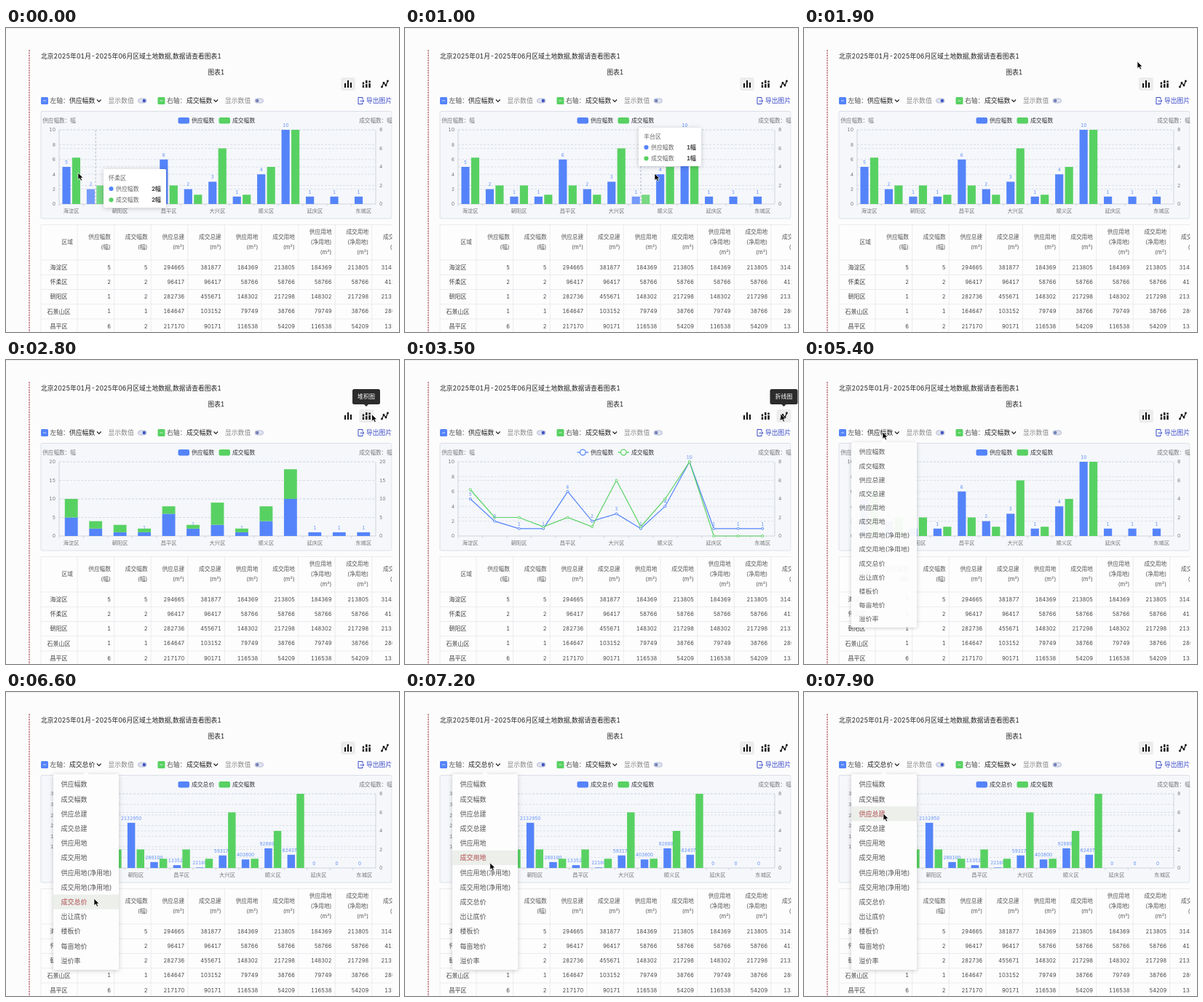
An HTML page for the animation above (8 s loop, 540 by 418 pixels).

```html
<!DOCTYPE html>
<html lang="zh-CN">
<head>
<meta charset="utf-8">
<title>区域土地数据</title>
<style>
html, body { margin: 0; width: 100%; height: 100%; overflow: hidden; background: #fcfcfc; }
svg { display: block; width: 100%; height: 100%; font-family: Inter, "Noto Sans CJK SC", sans-serif; font-variant-numeric: tabular-nums; }
.shadow { filter: drop-shadow(0 1px 3px #0003); }
</style>
</head>
<body>
<svg id="stage" viewBox="0 0 540 418"></svg>
<script>
const BLUE = '#5584fa', GREEN = '#58d163', STEP = 100, LOOP = 8000;
const names = '海淀区 怀柔区 朝阳区 石景山区 昌平区 通州区 大兴区 丰台区 顺义区 房山区 延庆区 密云区 东城区'.split(' ');
const supply = [5, 2, 1, 1, 6, 2, 3, 1, 4, 10, 1, 1, 1];
const deals = [5, 2, 2, 1, 2, 1, 6, 1, 4, 8, 0, 0, 0];
const price = [3143700, 412600, 2132950, 280100, 133520, 22160, 593175, 403800, 928800, 624370, 0, 0, 0];
const options = '供应幅数 成交幅数 供应总建 成交总建 供应用地 成交用地 供应用地(净用地) 成交用地(净用地) 成交总价 出让底价 楼板价 每亩地价 溢价率'.split(' ');
const areas = [
  [294665, 381877, 184369, 213805],
  [96417, 96417, 58766, 58766],
  [282736, 455671, 148302, 217298],
  [164647, 103152, 79749, 38766],
  [217170, 90171, 116538, 54209]
];

// Each chart: start time, kind
const charts = [[0, 'bar'], [2400, 'stack'], [3100, 'line'], [4400, 'bar'], [6200, 'price']];
// Icon hints: from, to, centre, label
const hints = [[2300, 2900, 495, '堆积图'], [3000, 3800, 520.5, '折线图'], [4200, 4700, 470, '柱状图']];
const cursorPath = [[0, 99, 199], [1000, 343, 200], [1400, 415, 125], [1900, 458, 46], [2300, 494, 74], [2700, 495, 75],
  [3000, 518, 74], [3500, 516, 74], [3700, 512, 73], [4200, 470, 75], [4500, 470, 75], [5200, 109, 99], [5400, 108, 99],
  [6100, 121, 284], [6700, 121, 284], [7300, 116, 225], [7900, 109, 167]];
const tipPath = [[0, 134, 194], [1000, 321, 137], [1400, 290, 120]];
const MENU_OPEN = 5300, TIP_END = 1400;

const clamp = v => Math.max(0, Math.min(1, v));
const easeOut = v => 1 - (1 - clamp(v)) ** 3;

function along(path, t) {
  const i = path.findIndex(p => p[0] > t);
  if (i < 0) return path[path.length - 1].slice(1);
  const [a, b] = [path[i - 1], path[i]], k = (t - a[0]) / (b[0] - a[0]);
  return [1, 2].map(n => a[n] + (b[n] - a[n]) * k);
}

// y is the vertical middle of the text
const text = (x, y, s, size = 8, fill = '#555', anchor = 'start', extra = '') =>
  `<text x="${x}" y="${y + size * .37}" font-size="${size}" fill="${fill}" text-anchor="${anchor}" ${extra}>${s}</text>`;
const rect = (x, y, w, h, fill, extra = '') =>
  `<rect x="${x}" y="${y}" width="${w}" height="${Math.max(0, h)}" fill="${fill}" ${extra}/>`;
const path = (d, stroke, width = 1, extra = '') =>
  `<path d="${d}" fill="none" stroke="${stroke}" stroke-width="${width}" ${extra}/>`;
const dot = (x, y, r, fill, extra = '') => `<circle cx="${x}" cy="${y}" r="${r}" fill="${fill}" ${extra}/>`;

function table() {
  const right = c => 144 + 50.6 * c, rowY = r => 329 + 20.25 * r;
  let s = rect(48, 270, 490, 150, '#fdfdfd') + text(92, 294, '区域', 7.7, '#555', 'end');
  let lines = 'M48 418V270.5H540';
  for (let r = 0; r < 5; r++) lines += `M48 ${319 + 20.25 * r}H540`;
  for (let c = 0; c < 9; c++) {
    lines += `M${98 + 50.6 * c} 270V418`;
    const head = c === 8 ? ['成交总价', '(万元)'] : [...options[c].replace('(', ' (').split(' '), c < 2 ? '(幅)' : '(m²)'];
    head.forEach((h, i) => s += text(right(c), 294 + 14 * (i - (head.length - 1) / 2), h, 7.7, '#555', 'end'));
  }
  areas.forEach((a, r) => {
    s += text(72.5, rowY(r), names[r], 8, '#444', 'middle');
    [supply[r], deals[r], ...a, ...a.slice(2), price[r]].forEach((v, c) =>
      s += text(right(c), rowY(r), v, 7.35, '#444', 'end'));
  });
  return s + path(lines, '#e6e8ec', .8);
}

function axisControl(x, colour, side, on) {
  return rect(x, 95, 10, 10, colour, 'rx="1.5"') + path(`M${x + 3} 100h4`, '#fff', .7)
    + text(x + 12.5, 100, side + '轴：', 8.8, '#555')
    + path(`M${x + 77} 98.5l2.8 2.8 2.8 -2.8`, '#222', 1.2)
    + text(x + 92.5, 100, '显示数值', 8.8, '#888')
    + rect(x + 133.5, 97, 11.5, 6, '#dfe2ee', 'rx="3" stroke="#a3abcc" stroke-width=".7"')
    + dot(x + (on ? 141.8 : 136.7), 100, 2.2, on ? '#3f55c5' : '#7480b8');
}

const base = rect(0, 0, 540, 418, '#fcfcfc') + path('M0 .5H540', '#eee')
  + path('M32 30V418', '#b4606c', 1.4, 'stroke-dasharray="2.2 1.2"')
  + text(48, 39, '北京2025年01月-2025年06月区域土地数据,数据请查看图表1', 8.75, '#222')
  + text(289, 61, '图表1', 8.6, '#222', 'middle')
  + axisControl(48, BLUE, '左', true) + axisControl(208.5, GREEN, '右', false)
  + text(248, 100, '成交幅数', 8.8, '#222')
  + path('M490 98V95.5H484V104.5H490V102.5M486.5 100.3H492M490.2 98.5L492 100.3L490.2 102', '#3b4cc9', 1)
  + text(495, 100, '导出图片', 8.8, '#3b4cc9')
  + table();

function icons(active) {
  const zigzag = [[516.5, 81], [519, 75.5], [522, 79], [524.5, 73]];
  return rect(460 + 25.3 * active, 68, 20, 18, '#ececec', 'rx="3"')
    + path('M466 76V82M470 72V82M474 75V82', '#111', 2)
    + path('M491 78.5V82M495.3 77V82M499.6 76V82M491 77.5V74.5M495.3 76V72M499.6 75V72.5', '#111', 2.4)
    + path('M' + zigzag.join('L'), '#111', 1.2) + zigzag.map(p => dot(...p, 1.4, '#111')).join('');
}

function chart(kind, grow, hover) {
  const isPrice = kind === 'price', isStack = kind === 'stack', isLine = kind === 'line';
  const left = isPrice ? 100 : 73, right = 508, top = 140, bottom = 242, height = bottom - top;
  const leftMax = isPrice ? 3.5e6 : isStack ? 20 : 10, rightMax = isStack ? 20 : 8;
  const leftSteps = isPrice ? 7 : isStack ? 4 : 5, rightSteps = 4;
  const values = isPrice ? price : supply, label = isPrice ? '成交总价' : '供应幅数';
  const gap = (right - left) / 13, bar = gap / 3;
  const mid = i => left + gap * (i + .5);
  let s = rect(48, 114.5, 482, 147.5, '#f5f7fb', 'rx="2" stroke="#d9dde5" stroke-width=".9"');
  s += text(left, 127, label + (isPrice ? '：万元' : '：幅'), 7.6, '#777', 'middle')
    + text(right, 127, '成交幅数：幅', 7.6, '#777', 'middle');

  let grid = '';
  for (let i = 0; i <= leftSteps; i++) {
    const y = bottom - height * i / leftSteps;
    if (i) grid += `M${left} ${y}H${right}`;
    s += text(left - 5, y, (leftMax * i / leftSteps).toLocaleString('en-US'), 6.7, '#777', 'end');
  }
  for (let i = 0; i <= rightSteps; i++) {
    const y = bottom - height * i / rightSteps;
    if (i) grid += `M${left} ${y}H${right}`;
    s += text(right + 5, y, rightMax * i / rightSteps, 6.7, '#777');
  }
  s += path(grid, '#d5dbe4', .8, 'stroke-dasharray="3 2"')
    + path(`M${left} ${top}V${bottom}H${right}V${top}`, '#c6cbd4', .8);

  [[236.5, BLUE, label], [292.5, GREEN, '成交幅数']].forEach(([x, c, name]) => {
    s += isLine
      ? path(`M${x} 127h15.5`, c, 1.3) + dot(x + 7.8, 127, 3.8, '#fff', `stroke="${c}" stroke-width="1.3"`)
      : rect(x, 123, 15.5, 8.5, c, 'rx="2.2"');
    s += text(x + 18.5, 127, name, 7.8, '#333');
  });

  if (hover >= 0) s += path(`M${mid(hover)} ${top}V${bottom}`, '#aab2c0', .8, 'stroke-dasharray="3 2"');

  const blueH = i => height * values[i] / leftMax, greenH = i => height * deals[i] / rightMax;
  let blues = '', greens = '', labels = '';
  names.forEach((name, i) => {
    const h = blueH(i) * (isLine ? 1 : grow), g = greenH(i) * (isLine ? 1 : grow), x = mid(i) - gap * .368;
    const tint = i === hover ? 'opacity=".8"' : '';
    let labelX = mid(i);
    if (isStack) {
      blues += rect(mid(i) - bar * .8, bottom - h, bar * 1.6, h, BLUE);
      greens += rect(mid(i) - bar * .8, bottom - h - g, bar * 1.6, g, GREEN);
    } else if (!isLine) {
      labelX = x + bar / 2;
      blues += rect(x, bottom - h, bar, h, BLUE, tint);
      greens += rect(x + gap * .403, bottom - g, bar, g, GREEN, tint);
    }
    labels += text(labelX, bottom - h - 6.5, values[i], 6.2, '#5d8cf5', 'middle');
    if (i % 2 === 0) s += text(mid(i), 251, name, 7.3, '#777', 'middle');
    s += path(`M${left + gap * i} ${bottom}v3`, '#c6cbd4', .7);
  });
  // Value labels belong to the blue bars, so green bars cover them
  if (!isLine) return s + blues + labels + greens;
  const series = (h, c) => path('M' + names.map((_, i) => `${mid(i)} ${bottom - h(i)}`).join('L'), c, 1.2)
    + names.map((_, i) => dot(mid(i), bottom - h(i), 1.5, '#fff', `stroke="${c}"`)).join('');
  return s + `<clipPath id="reveal">${rect(left, 130, (right - left) * grow, 120, '#000')}</clipPath>`
    + `<g clip-path="url(#reveal)">${series(blueH, BLUE)}${series(greenH, GREEN)}</g>` + labels;
}

function tooltip(x, y, i) {
  const row = (dy, c, name, v) => dot(x + 10.5, y + dy, 3.1, c) + text(x + 17, y + dy, name, 7.9, '#666')
    + text(x + 79, y + dy, v + '幅', 7.9, '#444', 'end', 'font-weight="700"');
  return rect(x, y, 86, 53, '#fff', 'rx="2" class="shadow"') + text(x + 7, y + 11.7, names[i], 8, '#666')
    + row(27, BLUE, '供应幅数', supply[i]) + row(42.3, GREEN, '成交幅数', deals[i]);
}

function hint(x, label) {
  return rect(x - 19, 40, 38, 21, '#2c2c2c', 'rx="2.5"') + `<path d="M${x - 3} 61h6l-3 3z" fill="#2c2c2c"/>`
    + text(x, 50.5, label, 8, '#fff', 'middle');
}

function menu(t, cursorY) {
  // Unfolds from .9 of its way to full size within a few steps
  const k = clamp((t - MENU_OPEN + 180) / 300), scale = k < 1 ? k * 1.015 : 1;
  const rowH = 20.2, hover = Math.floor((cursorY - 117) / rowH);
  let s = rect(65, 0, 90, 269, '#fdfdfd', 'rx="2" class="shadow"') + '<path d="M106 0l4 -4l4 4z" fill="#fdfdfd"/>';
  options.forEach((o, i) => {
    const on = i === hover, y = 14 + rowH * i;
    if (on) s += rect(65, y - rowH / 2, 90, rowH, '#ecefea');
    s += text(75.5, y, o, 9, on ? '#c28080' : '#555', 'start', on ? 'font-weight="700"' : '');
  });
  return `<g transform="translate(0 113) scale(1 ${scale})" opacity="${clamp(k * 1.02)}">${s}</g>`;
}

const cursor = (x, y) => `<path transform="translate(${x} ${y})" d="M0 0V9.6L2.3 7.6L3.9 11L5.6 10.2L4.1 7H7Z"
  fill="#000" stroke="#fff" stroke-width=".7"/>`;

function draw(t) {
  const [start, kind] = charts.filter(c => c[0] <= t).pop();
  const grow = start ? easeOut((t - start) / 400) : 1;
  const [cx, cy] = along(cursorPath, t);
  const hover = t < TIP_END ? Math.min(9, Math.floor((cx + 9 - 17 * clamp(t / 1000) - 73) / 33.46)) : -1;
  let s = icons(Math.max(0, ['bar', 'stack', 'line'].indexOf(kind)))
    + text(87, 100, kind === 'price' ? '成交总价' : '供应幅数', 8.8, '#222')
    + chart(kind, grow, hover) + rect(530.5, 110, 10, 308, '#fcfcfc');
  if (hover >= 0) s += tooltip(...along(tipPath, t), hover);
  hints.filter(h => t >= h[0] && t < h[1]).forEach(h => s += hint(h[2], h[3]));
  if (t >= MENU_OPEN) s += menu(t, cy);
  return s + cursor(cx, cy);
}

const stage = document.getElementById('stage');
stage.innerHTML = base + '<g id="live"></g>';
const live = document.getElementById('live');
const begin = performance.now();
let shown = -1;
function tick() {
  const t = Math.floor((performance.now() - begin) % LOOP / STEP) * STEP;
  if (t !== shown) live.innerHTML = draw(shown = t);
  requestAnimationFrame(tick);
}
tick();
</script>
</body>
</html>
```
